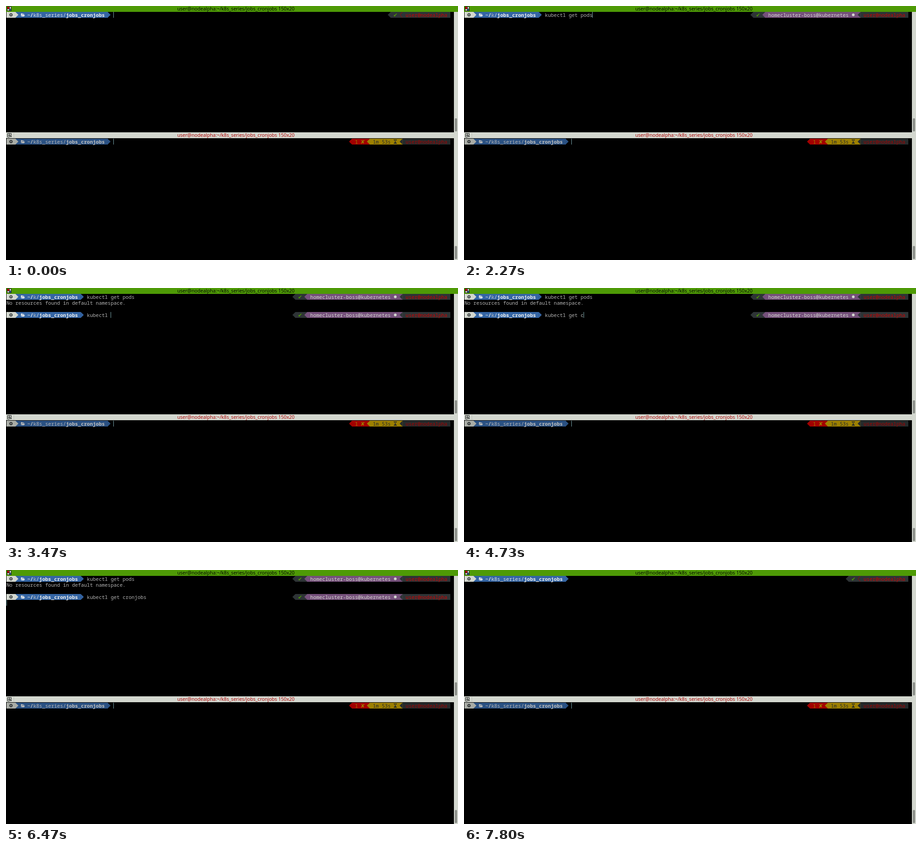
Recreate the animation shown at these times as an HTML page with a canvas. Size 998x561 px, loop 8 s.

```html
<!DOCTYPE html>
<html lang="en">
<head>
<meta charset="utf-8">
<title>Split terminal</title>
<style>
html, body { margin: 0; width: 100%; height: 100%; overflow: hidden; background: #000; }
canvas { display: block; }
</style>
</head>
<body>
<canvas id="stage" width="998" height="561"></canvas>
<script>
const ctx = document.getElementById('stage').getContext('2d');
const LOOP = 8000, CELL = 6.577, ROW = 13.2;
const MONO = '"Noto Sans Mono", "DejaVu Sans Mono", monospace';
const HOST = 'user@nodealpha';
const CONTEXT = 'homecluster-boss@kubernetes';
const TITLE = HOST + ':~/k8s_series/jobs_cronjobs 150x20';
const C = {
  fg: '#b2b2b2', light: '#d3d7cf', dark: '#2e3436', blue: '#3465a4', green: '#4e9a06',
  red: '#cc0000', yellow: '#c4a000', purple: '#75507b', white: '#eeeeec', cursor: '#7aa7ac'
};

// Key times, return key, output and next prompt for each command.
const COMMANDS = [
  { text: 'kubectl get pods', row: 0, enter: 2400, output: 2530, done: 2600,
    keys: [870, 1000, 1070, 1200, 1270, 1330, 1400, 1470, 1530, 1600, 1670, 1730, 2070, 2130, 2200, 2270] },
  { text: 'kubectl get cronjobs', row: 3, enter: 6400, output: 6600, done: 6670,
    keys: [2930, 3070, 3130, 3200, 3270, 3330, 3400, 3470, 3600, 3670, 3730, 3870,
           4730, 4870, 5070, 5270, 5730, 5870, 6070, 6270] }
];
const CLEAR = 7400, CURSOR_OFF = 7800;

const colX = col => 1 + col * CELL;
const rowY = row => Math.round(13 + row * ROW);

function box(x, y, w, h, color) {
  ctx.fillStyle = color;
  ctx.fillRect(x, y, w, h);
}

function poly(points, color) {
  ctx.fillStyle = color;
  ctx.beginPath();
  points.forEach(([x, y]) => ctx.lineTo(x, y));
  ctx.fill();
}

function disc(x, y, r, color) {
  ctx.fillStyle = color;
  ctx.beginPath();
  ctx.arc(x, y, r, 0, 7);
  ctx.fill();
}

function type(text, col, y, color, bold) {
  ctx.font = (bold ? 'bold ' : '') + '10.96px ' + MONO;
  ctx.fillStyle = color;
  [...text].forEach((ch, i) => ctx.fillText(ch, colX(col + i), y + 10.6));
}

function symbol(ch, col, y, color) {
  ctx.font = '11.5px "DejaVu Sans", sans-serif';
  ctx.fillStyle = color;
  ctx.fillText(ch, colX(col) - 1, y + 11);
}

function band(from, to, y, color) {
  const x = Math.round(colX(from));
  box(x, y, Math.round(colX(to)) - x, 13, color);
}

function arrow(col, y, color, left) {
  const a = colX(left ? col + 1 : col), b = colX(left ? col : col + 1);
  poly([[a, y], [b, y + 6.5], [a, y + 13]], color);
}

function gear(x, y) {
  ctx.strokeStyle = C.dark;
  ctx.lineWidth = 1.5;
  ctx.beginPath();
  ctx.arc(x, y, 2.2, 0, 7);
  for (let i = 0; i < 8; i++) {
    const a = i * Math.PI / 4, dx = Math.cos(a), dy = Math.sin(a);
    ctx.moveTo(x + dx * 2.5, y + dy * 2.5);
    ctx.lineTo(x + dx * 3.8, y + dy * 3.8);
  }
  ctx.stroke();
}

function folder(x, y) {
  poly([[x, y + 6], [x, y], [x + 3, y], [x + 4, y + 1], [x + 7, y + 1], [x + 7, y + 2.5],
        [x + 2, y + 2.5], [x + .6, y + 6]], C.white);
  poly([[x + 2.5, y + 3.3], [x + 8.8, y + 3.3], [x + 7, y + 6.6], [x + .8, y + 6.6]], C.white);
}

function hourglass(x, y) {
  box(x, y, 7, 1.2, C.dark);
  box(x, y + 7.8, 7, 1.2, C.dark);
  ctx.strokeStyle = C.dark;
  ctx.lineWidth = 1;
  ctx.beginPath();
  ctx.moveTo(x + 1.2, y + 1);
  ctx.lineTo(x + 5.8, y + 8);
  ctx.lineTo(x + 1.2, y + 8);
  ctx.lineTo(x + 5.8, y + 1);
  ctx.stroke();
  poly([[x + 1, y + 8], [x + 3.5, y + 5], [x + 6, y + 8]], C.dark);
}

// Draws the left prompt and returns the column where input begins.
function prompt(y, short) {
  const dir = short ? 'k' : 'k8s_series';
  const end = 24 + dir.length;
  band(0, 3, y, C.light);
  band(3, end, y, C.blue);
  arrow(3, y, C.light);
  arrow(end - .05, y, C.blue);
  gear(11, y + 6.5);
  folder(33, y + 3.5);
  type('~/', 7, y, C.white, true);
  type(dir, 9, y, short ? '#bcbcbc' : '#e4e4e4');
  type('/', 9 + dir.length, y, '#e4e4e4');
  type('jobs_cronjobs', 10 + dir.length, y, C.white, true);
  return end + 2;
}

function host(y) {
  band(133, 149, y, C.dark);
  type(HOST, 134, y, C.red);
}

function status(y, kube) {
  const start = kube ? 96 : 128;
  arrow(start, y, C.dark, true);
  band(start + 1, start + 5, y, C.dark);
  host(y);
  symbol('✔', start + 2, y, C.green);
  if (kube) {
    band(101, 133, y, C.purple);
    arrow(100, y, C.purple, true);
    type(CONTEXT, 102, y, C.light);
    disc(859.5, y + 6.5, 3, C.light);
    arrow(132, y, C.dark, true);
  } else {
    ctx.strokeStyle = '#a00808';
    ctx.lineWidth = 1;
    ctx.beginPath();
    ctx.moveTo(875, y + .5);
    ctx.lineTo(870, y + 6.5);
    ctx.lineTo(875, y + 12.5);
    ctx.stroke();
  }
}

function failure(y) {
  arrow(115, y, C.red, true);
  band(116, 122, y, C.red);
  type('1', 117, y, C.yellow);
  symbol('✘', 119, y, C.yellow);
  band(122, 133, y, C.yellow);
  arrow(121, y, C.yellow, true);
  type('1m 53s', 123, y, C.dark);
  hourglass(856, y + 2);
  arrow(132, y, C.dark, true);
  host(y);
}

function cursor(col, y) {
  box(Math.round(colX(col) - .5), y, 1, 13, C.cursor);
}

function title(y, bg, color) {
  box(0, y, 998, 13, bg);
  ctx.font = '10.65px "Open Sans", "Noto Sans", sans-serif';
  ctx.fillStyle = color;
  ctx.textAlign = 'center';
  ctx.fillText(TITLE, 507.7, y + 10);
  ctx.textAlign = 'left';
}

function scrollbar(top, bottom, thumb) {
  box(989, top, 9, bottom - top, C.light);
  ctx.fillStyle = '#8b8e89';
  ctx.beginPath();
  ctx.roundRect(991, thumb, 5, 29, 2);
  ctx.fill();
}

function frameIcons() {
  box(2, 1, 10, 10, '#16181a');
  box(3, 2, 4, 4, C.red);
  box(8, 2, 3, 4, C.light);
  box(3, 7, 4, 3, C.light);
  box(8, 7, 3, 3, C.blue);

  ctx.strokeStyle = '#1c1e1f';
  ctx.lineWidth = 1;
  ctx.strokeRect(3.5, 281.5, 4, 4);
  ctx.strokeRect(7.5, 281.5, 4, 4);
  ctx.strokeRect(3.5, 285.5, 4, 4);
  poly([[8.5, 287], [13, 287], [10.7, 290]], '#1c1e1f');
  box(17, 280, 1, 11, '#c0c4bc');
}

function freshPrompt(row, t) {
  const y = rowY(row), col = prompt(y, false);
  status(y, false);
  if (t < CURSOR_OFF) cursor(col, y);
}

function session(t) {
  if (t >= CLEAR) return freshPrompt(0, t);
  for (const cmd of COMMANDS) {
    const y = rowY(cmd.row);
    const count = cmd.keys.filter(k => k <= t).length;
    const kube = count >= 7;
    const col = prompt(y, kube);
    status(y, kube);
    type(cmd.text.slice(0, count), col, y, C.fg);
    if (t < cmd.enter) return cursor(col + count, y);
    if (t >= cmd.output) type('No resources found in default namespace.', 0, rowY(cmd.row + 1), C.fg);
    if (t < cmd.done) return cursor(0, rowY(cmd.row + (t < cmd.output ? 1 : 2)));
  }
  freshPrompt(6, t);
}

function draw(t) {
  box(0, 0, 998, 561, '#000');
  session(t);

  const col = prompt(293, false);
  failure(293);
  box(0, 292, 989, 269, 'rgba(0,0,0,.2)');
  cursor(col, 293);

  title(0, C.green, '#000');
  title(279, C.light, '#b00000');
  scrollbar(13, 279, 248);
  scrollbar(292, 561, 530);
  frameIcons();
}

const start = performance.now();
function tick() {
  draw((performance.now() - start) % LOOP);
  requestAnimationFrame(tick);
}
tick();
</script>
</body>
</html>
```
